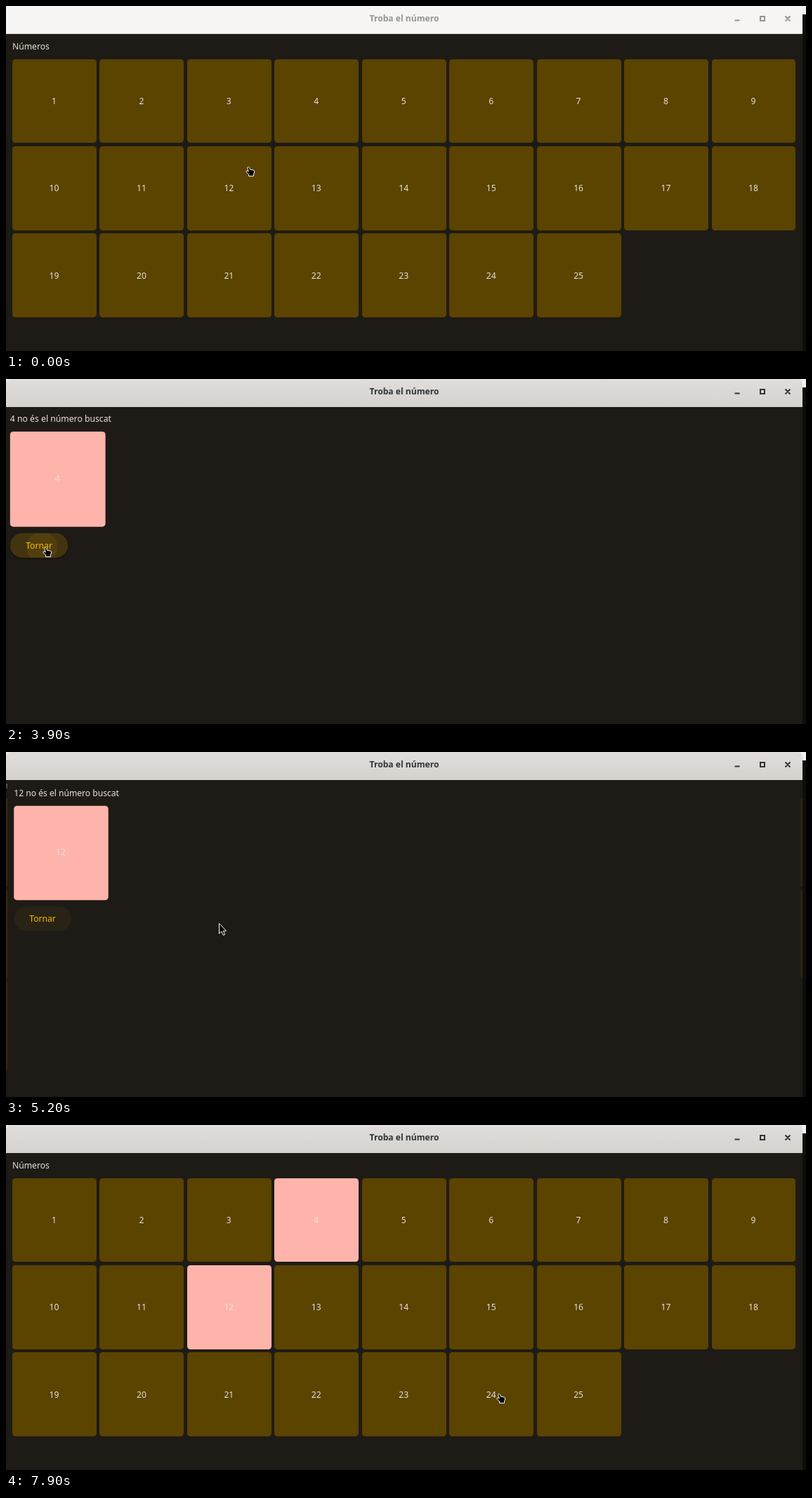
Animation, 1139 px wide and 492 px high, one loop 8 s. Source, as an HTML page:

```html
<!DOCTYPE html>
<html lang="ca">
<head>
<meta charset="utf-8">
<title>Troba el número</title>
<style>
html, body { margin: 0; width: 100%; height: 100%; overflow: hidden; }
body {
  position: relative;
  background: linear-gradient(#f1f1f0 12px, #0e0e0d 12px);
  font: 12.15px/17.5px "Noto Sans", sans-serif;
  color: #e9e1d9;
}
body, body * { box-sizing: border-box; }
.loop { animation: 8s step-end infinite; }

/* Window frame */
#bar {
  position: absolute; left: 0; top: 0; width: 1134px; height: 40px;
  border-radius: 7px 7px 0 0;
  border-bottom: 1px solid #d5d0cc;
  font-weight: 700; font-size: 12.1px; line-height: 35.4px; text-align: center;
  animation-name: focus;
}
#bar svg { position: absolute; left: 1030px; top: 0; fill: none; stroke: currentColor; stroke-width: 2; }
@keyframes focus {
  0% { background: #f6f5f4; color: #929595; }
  16.25%, 100% { background: linear-gradient(#e0dddb, #d6d2ce); color: #2e3436; }
}
#view {
  position: absolute; left: 0; top: 40px; width: 1134px; height: 452px;
  overflow: hidden; background: #1e1b16;
}

/* Pages */
.page {
  position: absolute; inset: 0; padding: 9px;
  background: #1e1b16; box-shadow: 0 0 0 40px #1e1b1699;
}
.page p { margin: 0 0 9px; white-space: nowrap; }
.grid { display: grid; grid: auto-flow 119.95px / repeat(9, 119.95px); gap: 4.5px; }
.tile {
  display: flex; align-items: center; justify-content: center;
  padding-right: 1px; border-radius: 4.5px; background: #5b4300;
}
.wrong { background: #ffb4ab; }
.card .tile { width: 135px; height: 135px; }
.button {
  position: relative; width: 82px; height: 35.5px; margin-top: 9px;
  border-radius: 18px; overflow: hidden;
  font-weight: 500; line-height: 35.5px; text-align: center; color: #fabd00;
  background: #292315;
}
.ripple {
  position: absolute; left: 45px; top: 20px; width: 44px; height: 44px;
  margin: -22px; border-radius: 50%; background: #fabd0014;
}

#list0 { animation-name: list0; }
#card4 { animation-name: card4; }
#list1 { animation-name: list1; }
#card12 { animation-name: card12; }
#list2 { animation-name: list2; }
@keyframes list0 {
  0% { visibility: visible; scale: 1; }
  17.5% { visibility: visible; scale: 1.043; }
  18.75%, 100% { visibility: hidden; }
}
@keyframes card4 {
  0% { visibility: hidden; }
  17.5% { visibility: visible; scale: .979; }
  18.75% { visibility: visible; scale: 1; }
  48.75% { visibility: visible; scale: 1.0057; }
  50% { visibility: visible; scale: 1.043; }
  51.25% { visibility: visible; scale: 1.0485; }
  52.5%, 100% { visibility: hidden; }
}
@keyframes list1 {
  0% { visibility: hidden; }
  50% { visibility: visible; scale: .979; }
  51.25% { visibility: visible; scale: .996; }
  52.5% { visibility: visible; scale: 1; }
  62.5% { visibility: visible; scale: 1.0057; }
  63.75% { visibility: visible; scale: 1.043; }
  65% { visibility: visible; scale: 1.0485; }
  66.25%, 100% { visibility: hidden; }
}
@keyframes card12 {
  0% { visibility: hidden; }
  63.75% { visibility: visible; scale: .979; }
  65% { visibility: visible; scale: .996; }
  66.25% { visibility: visible; scale: 1; }
  80% { visibility: visible; scale: 1.043; }
  82.5% { visibility: visible; scale: 1.0485; }
  83.75%, 100% { visibility: hidden; }
}
@keyframes list2 {
  0% { visibility: hidden; }
  80% { visibility: visible; scale: .979; }
  82.5% { visibility: visible; scale: .996; }
  83.75%, 100% { visibility: visible; scale: 1; }
}

/* Button feedback */
#card4 .button { animation-name: hover4; }
#card12 .button { animation-name: hover12; }
#card4 .ripple { animation-name: ripple4; }
#card12 .ripple { animation-name: ripple12; }
@keyframes hover4 {
  0% { background: #292315; }
  36.25% { background: #362b12; }
  37.5%, 100% { background: #433410; box-shadow: 0 1px 3px #0008; }
}
@keyframes hover12 {
  0% { background: #292315; }
  78.75%, 100% { background: #433410; box-shadow: 0 1px 3px #0008; }
}
@keyframes ripple4 {
  0% { scale: 0; }
  47.5% { scale: .45; }
  48.75%, 100% { scale: 1; }
}
@keyframes ripple12 {
  0% { scale: 0; }
  78.75%, 100% { scale: .73; }
}

/* Pointer */
#pointer {
  position: absolute; left: 0; top: 0; width: 1px; height: 1px; overflow: visible;
  stroke: #fff; stroke-linejoin: round; animation-name: move;
}
#arrow { animation-name: arrow; }
#hand { animation-name: hand; }
@keyframes arrow {
  0% { visibility: hidden; }
  16.25% { visibility: visible; }
  36.25% { visibility: hidden; }
  62.5% { visibility: visible; }
  71.25%, 100% { visibility: hidden; }
}
@keyframes hand {
  0% { visibility: visible; }
  16.25% { visibility: hidden; }
  36.25% { visibility: visible; }
  62.5% { visibility: hidden; }
  71.25%, 100% { visibility: visible; }
}
@keyframes move {
  0% { translate: 345px 229px; }
  1.25% { translate: 356px 228px; }
  2.5% { translate: 366px 226px; }
  5% { translate: 415px 205px; }
  7.5% { translate: 424px 190px; }
  8.75% { translate: 434px 172px; }
  10% { translate: 441px 158px; }
  11.25% { translate: 446px 147px; }
  12.5% { translate: 447px 143px; }
  22.5% { translate: 440px 145px; }
  23.75% { translate: 405px 158px; }
  25% { translate: 350px 180px; }
  26.25% { translate: 285px 203px; }
  27.5% { translate: 230px 222px; }
  28.75% { translate: 190px 236px; }
  30% { translate: 173px 239px; }
  31.25% { translate: 170px 239px; }
  32.5% { translate: 172px 239px; }
  33.75% { translate: 160px 242px; }
  35% { translate: 120px 242px; }
  36.25% { translate: 85px 241px; }
  37.5% { translate: 66px 240px; }
  38.75% { translate: 58px 240px; }
  40% { translate: 56px 240px; }
  57.5% { translate: 170px 236px; }
  58.75% { translate: 296px 243px; }
  61.25% { translate: 303px 244px; }
  66.25% { translate: 270px 234px; }
  67.5% { translate: 216px 225px; }
  70% { translate: 150px 231px; }
  71.25% { translate: 80px 236px; }
  72.5% { translate: 56px 238px; }
  92.5% { translate: 190px 237px; }
  93.75% { translate: 370px 234px; }
  98.75%, 100% { translate: 702px 383px; }
}
</style>
</head>
<body>
<div id="bar" class="loop">Troba el número
  <svg width="100" height="36">
    <path d="M7.5 20.5h7M44 15h6v6h-6zM79.5 14.5l7 7m0-7l-7 7"/>
  </svg>
</div>
<div id="view"></div>
<svg id="pointer" class="loop">
  <path id="arrow" class="loop" d="M.5.5V15l3.4-3.2 2.4 5.5 2.3-1-2.3-5.2h4.2z"/>
  <path id="hand" class="loop" d="M-1.2 2C-1.4.2.8-.1 1.4 1.2L2.6 4.2 7 5Q9.2 5.6 8.7 8L7.5 10.6V13.6H.6V11L-3 7.8Q-3.5 6 -1.8 6L.3 7z"/>
</svg>
<script>
const tile = (n, wrong) => `<div class="tile${wrong ? ' wrong' : ''}">${n}</div>`;

const list = (id, ...wrong) => {
  const tiles = Array.from({ length: 25 }, (_, i) => tile(i + 1, wrong.includes(i + 1)));
  return `<div id="${id}" class="page loop"><p>Números</p><div class="grid">${tiles.join('')}</div></div>`;
};

const card = n => `<div id="card${n}" class="page card loop">
  <p>${n} no és el número buscat</p>${tile(n, true)}
  <div class="button loop">Tornar<div class="ripple loop"></div></div></div>`;

document.getElementById('view').innerHTML =
  list('list0') + card(4) + list('list1', 4) + card(12) + list('list2', 4, 12);
</script>
</body>
</html>
```
